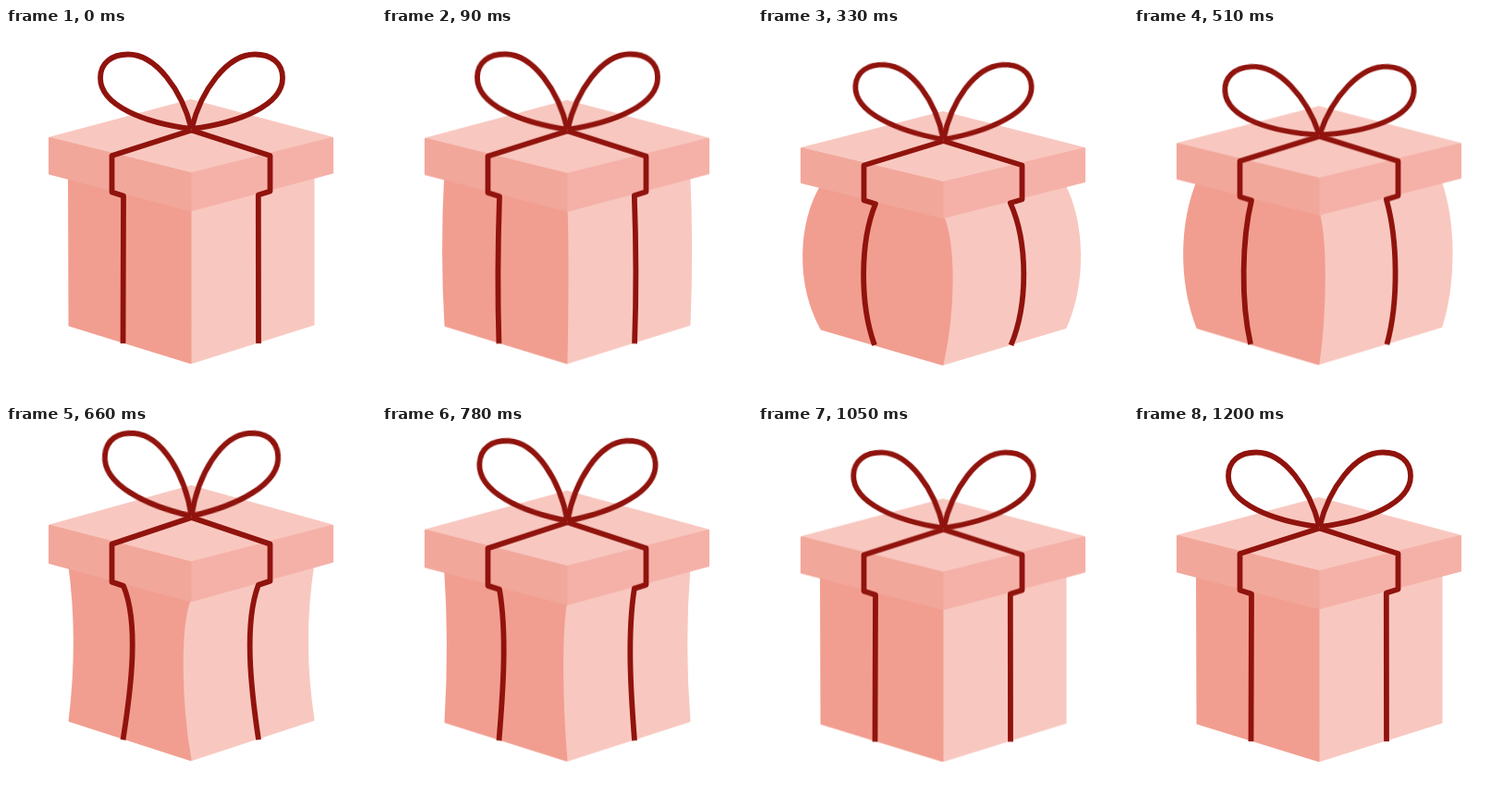
Write an HTML page that moves like this. It is 400x400 px and loops after 1230 ms.

```html
<!DOCTYPE html>
<html lang="en">
<head>
<meta charset="utf-8">
<title>Gift box</title>
<style>
html, body { margin: 0; width: 100%; height: 100%; overflow: hidden; background: #fff; }
svg { display: block; width: 100vw; height: 100vh; }

.box, .box path {
  animation: 1230ms cubic-bezier(.65, 0, .35, 1) infinite;
}
.box { animation-name: squash; transform-origin: 200px 385px; }

.face { stroke-width: 2; stroke-linejoin: round; }
.pale { fill: #f8c8c0; stroke: #f8c8c0; }
.rose { fill: #f5b1a8; stroke: #f5b1a8; }
.coral { fill: #f2a79b; stroke: #f2a79b; }
.deep { fill: #f19e90; stroke: #f19e90; }
.ribbon { fill: none; stroke: #90130d; stroke-width: 5.8; stroke-linejoin: round; }

.box .left { animation-name: left; }
.box .right { animation-name: right; }
.box .tie-left { animation-name: tie-left; }
.box .tie-right { animation-name: tie-right; }
.box .loop {
  d: path("M200.500 109C190 67 162 28.500 132 28.500C114 28.500 102 38 102 54C102 84 150 102.500 200.500 109");
  animation-name: flap;
  transform-origin: 200.5px 109px;
}

@keyframes squash {
  0%, 94%, 100% { transform: scaleY(1); }
  31.5%, 32.5% { transform: scaleY(.957); }
  56.1% { transform: scaleY(1.043); }
  73.2% { transform: scaleY(.982); }
}

@keyframes flap {
  0%, 97.6%, 100% { transform: rotate(0deg); }
  19.5% { transform: rotate(4.8deg); }
  41% { transform: rotate(-4deg); }
  56.1% { transform: rotate(5deg); }
  73.2% { transform: rotate(0deg); }
  87.8% { transform: rotate(1.3deg); }
}

/* Body sides: straight, then bulging, then pinched */
@keyframes left {
  0%, 70.7%, 100% { d: path("M68 158C68 211 68 266 68.500 321.500L199.500 362V362C199.500 300 199.500 222 199.500 194Z"); }
  25.5%, 33% { d: path("M70 158C43 205 42 272 68.500 323L199.500 363V363C213 300 213 226 199.500 194Z"); }
  56.1% { d: path("M68 158C76 211 76 266 68.500 321.500L199.500 362V362C188 300 187 222 199.500 194Z"); }
}
@keyframes right {
  0%, 70.7%, 100% { d: path("M332.500 158C332.500 211 332.500 266 332.500 320.500L200.500 362L186 340V190Z"); }
  25.5%, 33% { d: path("M330.500 158C353.500 205 353.500 272 332.500 321.500L200.500 362.500L186 340V190Z"); }
  56.1% { d: path("M332.500 158C323.500 211 323.500 266 332.500 320.500L200.500 362L186 340V190Z"); }
}
@keyframes tie-left {
  0%, 70.7%, 100% { d: path("M200.500 110.500L114.500 138V177.500L127 181.500C127 235 126.500 288 126.500 341"); }
  25.5%, 33% { d: path("M200.500 110.500L114.500 138V177.500L127 181.500C110 225 110 295 126 341"); }
  56.1% { d: path("M200.500 110.500L114.500 138V177.500L127 181.500C144 220 136 285 126.500 341"); }
}
@keyframes tie-right {
  0%, 70.7%, 100% { d: path("M200.500 110.500L285.500 138V176.500L272.800 180.500C272.800 235 273 288 273 341"); }
  25.5%, 33% { d: path("M200.500 110.500L285.500 138V176.500L272.800 180.500C292 225 292 295 273.500 341"); }
  56.1% { d: path("M200.500 110.500L285.500 138V176.500L272.800 180.500C257 220 264 285 273 341"); }
}
</style>
</head>
<body>
<svg viewBox="0 0 400 400">
  <g class="box">
    <path class="face pale right"/>
    <path class="face deep left"/>
    <path class="face pale" d="M48 118.500L200 78L352 118.500L200 157Z"/>
    <path class="face rose" d="M353 119L201 157V197L353 156.500Z"/>
    <path class="face coral" d="M47 119L199.500 157V197L47 157.500Z"/>
    <path class="ribbon tie-left"/>
    <path class="ribbon tie-right"/>
    <path class="ribbon loop"/>
    <g transform="translate(401 0) scale(-1 1)"><path class="ribbon loop"/></g>
  </g>
</svg>
</body>
</html>
```
